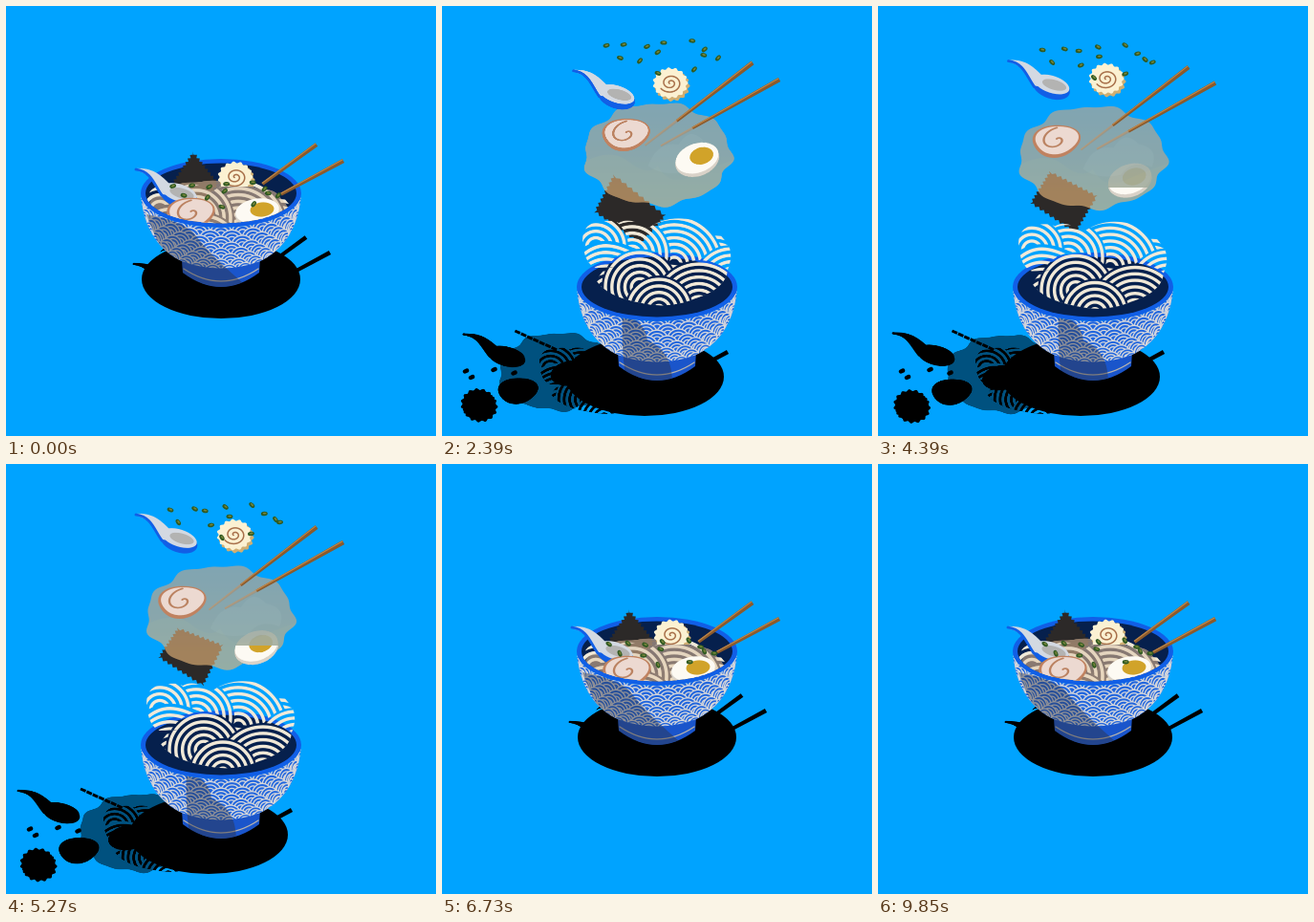
An HTML page with a canvas that plays this animation: 450 px wide and 450 px high, repeating every 9910 ms.

```html
<!DOCTYPE html>
<html lang="en">
<head>
<meta charset="utf-8">
<title>Ramen bowl</title>
<style>
html, body { margin: 0; width: 100%; height: 100%; overflow: hidden; background: #00a3ff; }
canvas { display: block; width: 450px; height: 450px; }
</style>
</head>
<body>
<canvas id="stage" width="450" height="450"></canvas>
<script>
const g = document.getElementById('stage').getContext('2d');
const LOOP = 9910, TAU = Math.PI * 2, BLUE = '#115fe6', CREAM = '#f1e9d8';
const lerp = (a, b, k) => a + (b - a) * k;
const clamp = (v, a = 0, b = 1) => Math.min(b, Math.max(a, v));
const ease = u => u < .5 ? 2 * u * u : 1 - 2 * (1 - u) * (1 - u);

function key(t, keys) {
  let i = 0;
  while (i < keys.length - 2 && t > keys[i + 1][0]) i++;
  const [a, b] = [keys[i], keys[i + 1]];
  return lerp(a[1], b[1], clamp((t - a[0]) / (b[0] - a[0])));
}

function oval(c, x, y, rx, ry, fill, rot = 0) {
  c.beginPath();
  c.ellipse(x, y, rx, ry, rot, 0, TAU);
  c.fillStyle = fill;
  c.fill();
}

function line(c, path, color, width) {
  c.strokeStyle = color;
  c.lineWidth = width;
  c.stroke(new Path2D(path));
}

function area(c, path, fill) {
  c.fillStyle = fill;
  c.fill(new Path2D(path));
}

// Closed outline from a polar radius function
function polar(c, rx, ry, radius, fill) {
  c.beginPath();
  for (let a = 0; a < TAU; a += .04) c.lineTo(rx * radius(a) * Math.cos(a), ry * radius(a) * Math.sin(a));
  c.closePath();
  c.fillStyle = fill;
  c.fill();
}

function spiral(c, size, turns, color, width) {
  c.beginPath();
  for (let a = 0; a < turns * TAU; a += .1) {
    const r = 1 + size * a / (turns * TAU);
    c.lineTo(r * Math.cos(a + 2.6), r * Math.sin(a + 2.6) * .85);
  }
  c.strokeStyle = color;
  c.lineWidth = width;
  c.stroke();
}

// A picture drawn once around its centre, with a black silhouette for the shadow
function sprite(w, h, draw) {
  const make = () => Object.assign(document.createElement('canvas'), { width: w * 2, height: h * 2 });
  const image = make(), dark = make();
  const c = image.getContext('2d'), d = dark.getContext('2d');
  c.setTransform(2, 0, 0, 2, w, h);
  c.lineCap = c.lineJoin = 'round';
  draw(c);
  d.drawImage(image, 0, 0);
  d.globalCompositeOperation = 'source-in';
  d.fillRect(0, 0, w * 2, h * 2);
  return { image, dark, w, h };
}

function put(s, [x, y], { sx = 1, sy = 1, rot = 0, alpha = 1, dark = false } = {}) {
  g.save();
  g.translate(x, y);
  g.rotate(rot);
  g.scale(sx, sy);
  g.globalAlpha = alpha;
  g.drawImage(dark ? s.dark : s.image, -s.w / 2, -s.h / 2, s.w, s.h);
  g.restore();
}

const noodles = sprite(164, 104, c => {
  c.clip(new Path2D('M-78-24Q-78-42-62-44Q-46-47-40-43Q-28-50-10-37Q10-52 38-46Q58-42 70-26Q82-14 74 6Q72 26 40 36Q12 48 -20 40Q-52 34-63 18Q-58 4-45 3L-64 4Q-76 0-78-24Z'));
  const rings = [[62, 2, 30], [18, 0, 48], [-26, -10, 36], [-64, -18, 30], [78, 22, 38], [-52, 30, 28], [-18, 24, 36], [44, 46, 46], [2, 48, 32]];
  const fan = ([x, y, r]) => {
    c.globalCompositeOperation = 'destination-out';
    oval(c, x, y, r + 4, r + 4, '#000');
    c.globalCompositeOperation = 'source-over';
    c.strokeStyle = CREAM;
    c.lineWidth = 3.4;
    for (let q = r; q > 1; q -= 6.8) {
      c.beginPath();
      c.arc(x, y, q, 0, TAU);
      c.stroke();
    }
  };
  rings.slice(0, 4).forEach(fan);
  const band = y => `M-80 ${y}C-50 ${y - 30} -22 ${y + 4} 6 ${y + 8}S52 ${y + 14} 80 ${y + 10}`;
  c.globalCompositeOperation = 'destination-out';
  line(c, band(0), '#000', 24);
  c.globalCompositeOperation = 'source-over';
  for (const y of [-7, 0, 7]) line(c, band(y), CREAM, 3.4);
  rings.slice(4).forEach(fan);
});

const broth = sprite(170, 124, c => {
  const edge = a => .97 + .03 * Math.sin(9 * a + 1) + .02 * Math.sin(14 * a);
  const tint = c.createLinearGradient(0, -50, 0, 55);
  tint.addColorStop(0, 'rgb(196,166,138)');
  tint.addColorStop(.45, 'rgb(208,168,130)');
  tint.addColorStop(1, 'rgb(226,178,118)');
  polar(c, 79, 55, edge, tint);
  c.globalCompositeOperation = 'source-atop';
  area(c, 'M-80 10Q-50-8-30 8T0 12Q12 34 34 24T80 6V70H-80Z', 'rgba(228,180,120,.35)');
  area(c, 'M-10 12Q0-14 22-10Q34-30 48-14Q70-10 62 10Q40 2 30 18Q6 24-10 12Z', 'rgba(235,195,150,.25)');
});

const naruto = sprite(46, 44, c => {
  const edge = a => 1 + .06 * Math.cos(15 * a);
  c.translate(1, 2);
  polar(c, 17.5, 15.5, edge, '#cfae72');
  c.translate(-2, -3);
  polar(c, 17.5, 15.5, edge, '#fbf1d2');
  spiral(c, 11, 2, '#a8704a', 1.5);
});

const chashu = sprite(58, 44, c => {
  c.rotate(-.1);
  const edge = a => 1 + .05 * Math.cos(3 * a + 1);
  polar(c, 25, 17, edge, '#c08260');
  c.translate(.5, -1);
  polar(c, 22.5, 14.5, edge, '#ecd9d1');
  c.scale(1.4, .95);
  c.rotate(2.2);
  spiral(c, 13, 1, '#bb8261', 1.7);
});

const egg = sprite(60, 44, c => {
  oval(c, 0, 1.5, 23.5, 14, '#d9d2c8', -.15);
  oval(c, 0, -.5, 23, 13, '#fdfaf3', -.15);
  oval(c, 5, -2, 12.5, 7.5, '#d1a329', -.1);
});

const spoon = sprite(110, 66, c => {
  oval(c, -1, 2, 20, 11.5, BLUE, .32);
  area(c, 'M-46-27C-28-28-20-20-10-10L-8 2L-18 0C-26-10-30-21-46-25Z', '#d3d9e2');
  oval(c, -.5, -1.5, 19, 9, '#d3d9e2', .32);
  oval(c, 2, -1, 13, 5.2, '#b3b3b2', .28);
  line(c, 'M-46-26C-30-24-27-10-19 1', BLUE, 2.8);
});

const BODY = 'M-84 0C-81 42-60 62-41 71Q0 86 41 71C60 62 81 42 84 0A84 36 0 0 1-84 0Z';
const FOOT = 'M-41 68L-40 83Q0 113 40 83L41 68Z';

const bowl = sprite(180, 206, c => {
  area(c, FOOT, '#1a55cb');
  line(c, 'M-39 79Q0 105 39 79', '#b7b3ae', 1.3);
  c.clip(new Path2D(BODY));
  area(c, BODY, BLUE);
  c.strokeStyle = '#d6d7db';
  c.lineWidth = 1.3;
  // Overlapping wave scales wrapped around the bowl, top row first
  for (let row = 0; row < 10; row++) {
    const depth = row * 6.8 - 2, radius = 84 - 34 * Math.pow(Math.max(0, depth) / 62, 1.8);
    for (let i = -6; i <= 6; i++) {
      const a = (i + row % 2 / 2) * .275, r = radius * .145;
      const x = radius * Math.sin(a), y = depth + radius * .4 * Math.cos(a) + 12;
      if (Math.cos(a) < 0) continue;
      for (const q of [1, .7, .4]) {
        c.beginPath();
        c.ellipse(x, y, r * q * (.25 + .75 * Math.cos(a)), r * q * .95, 0, 0, TAU);
        c.fillStyle = '#2166de';
        c.fill();
        c.stroke();
      }
    }
  }
});

const chives = [[172, 44], [193, 43], [212, 45], [231, 41], [229, 51], [260, 39], [273, 48], [277, 54], [288, 57], [184, 57], [210, 60], [226, 73], [261, 69]];
const noriClosed = [[196, 153], [174, 186], [198, 215], [222, 186]];
const noriOpen = [[180, 175], [160, 210], [207, 242], [231, 208]];
const noriLate = [[180, 172], [160, 202], [206, 232], [227, 190]];

function jagged(corners) {
  g.beginPath();
  corners.forEach(([x, y], k) => {
    const [u, v] = corners[(k + 1) % 4], len = Math.hypot(u - x, v - y);
    for (let i = 0; i < 18; i++) {
      const off = i % 2 ? 1.3 : -1.3;
      g.lineTo(lerp(x, u, i / 18) + (v - y) / len * off, lerp(y, v, i / 18) - (u - x) / len * off);
    }
  });
  g.closePath();
  g.fillStyle = '#2c2928';
  g.fill();
}

function chopstick([x, y], slope, length, color) {
  const n = Math.hypot(1, slope), dx = -1 / n, dy = slope / n;
  const taper = lerp(2.3, .9, length / 145);
  const ex = x + dx * length, ey = y + dy * length;
  g.beginPath();
  g.moveTo(x - dy * 2.3, y + dx * 2.3);
  g.lineTo(x + dy * 2.3, y - dx * 2.3);
  g.lineTo(ex + dy * taper, ey - dx * taper);
  g.lineTo(ex - dy * taper, ey + dx * taper);
  g.fillStyle = color;
  g.fill();
  if (color === '#000') return;
  g.beginPath();
  g.moveTo(x - dy * 1.4, y + dx * 1.4);
  g.lineTo(ex - dy * taper * .6, ey + dx * taper * .6);
  g.strokeStyle = '#bd8649';
  g.lineWidth = 1.2;
  g.stroke();
}

function clipped(x, y, w, h, draw) {
  g.save();
  g.beginPath();
  g.rect(x, y, w, h);
  g.clip();
  draw();
  g.restore();
}

function render(t) {
  const p = t < 4000 ? ease(clamp((t - 930) / 1250)) : 1 - ease(clamp((t - 5950) / 770));
  const drift = (clamp(t, 2100, 6200) - 3520) / 1750;
  const bob = 1.8 * Math.sin(Math.PI * clamp((t - 6720) / 3190));
  const s = (a, b) => lerp(a, b, p);
  // closed place, open place, open place after the slow drift
  const at = (x0, y0, x1, y1, x2 = x1, y2 = y1) =>
    [s(x0, lerp(x1, x2, drift)), s(y0, lerp(y1, y2, drift))];

  g.fillStyle = '#00a3ff';
  g.fillRect(0, 0, 450, 450);

  // Shadows
  const shade = (item, pos, sx = 1, sy = 1, alpha = 1) => put(item, pos, { sx, sy, alpha, dark: true });
  shade(broth, at(222, 286, 128, 384, 138, 386), .8, s(.68, .76), .5);
  shade(noodles, at(225, 286, 168, 393), .85, .78);
  shade(spoon, at(180, 292, 65, 365, 59, 364), 1, .85);
  shade(naruto, at(225, 282, 37, 418, 34, 419));
  shade(chashu, at(205, 288, 78, 403, 76, 404), .84, .8);
  shade(egg, at(235, 285, 132, 386, 128, 390), .9, .9);
  const [nx, ny] = at(185, 275, 77, 340, 78, 340);
  g.setLineDash([6, 1]);
  line(g, `M${nx} ${ny}l44 ${s(8, 20)}`, '#000', 3);
  g.setLineDash([]);
  chives.filter((_, i) => i % 3 === 0).forEach(([x, y]) => {
    const [sx, sy] = at(215 + (x - 225) * .5, 285, 25 + (x - 172) * .5, 385 + (y - 50) * .5);
    oval(g, sx, sy, 3.4, 2.3, '#000', -.4);
  });
  for (const [x, y, slope] of [[314, 242, .73], [339, 258, .54]]) {
    const [cx, cy] = at(x, y, x - 40, y + 104);
    chopstick([cx + bob * .6, cy + bob * .6], slope, 62, '#000');
  }
  const [ex, ey] = at(225, 286, 212, 388);
  oval(g, ex, ey, 83, 41, '#000');

  // Bowl
  const [bx, by] = at(225, 196, 225, 294);
  oval(g, bx, by, 84, 36, BLUE);
  put(bowl, [bx, by]);
  g.save();
  g.translate(bx, by);
  g.clip(new Path2D(BODY + FOOT));
  area(g, `M${s(-78, -36)} ${s(22, 28)}Q${s(-35, -12)} ${s(30, 36)} ${s(-25, -10)} ${s(46, 56)}Q${s(-10, 16)} 66 ${s(30, 16)} 100H-32Q${s(-64, -38)} 64 ${s(-78, -36)} ${s(22, 28)}Z`, 'rgba(48,48,58,.42)');
  g.restore();
  oval(g, bx, by, 79, 31.5, '#06204d');

  // Contents, hidden by the front of the rim
  const sticks = [[at(325, 145, 325, 62, 325, 66), s(.73, .77), s(70, 100)],
                  [at(353, 162, 353, 79, 353, 82), s(.54, .56), s(74, 104)]];
  const eggAt = at(263, 215, 265, 172, 262, 191);
  const eggPose = { rot: -.12 * p, sy: s(1, 1.18) };
  const eggCut = key(t, [[2150, -30], [3520, 18], [5270, -1], [6200, -30]]);
  const noodleAt = at(225, 232, 225, 272, 225, 275);
  g.save();
  g.beginPath();
  g.rect(0, -50, 450, by + 50);
  g.ellipse(bx, by, 79, 31.5, 0, 0, Math.PI);
  g.clip();
  jagged(noriClosed.map(([x, y], i) => at(x, y, ...noriOpen[i], ...noriLate[i])));
  put(noodles, noodleAt);
  g.globalAlpha = p * .5;
  for (const [pos, slope] of sticks) chopstick(pos, slope, 142, '#7c4f25');
  g.globalAlpha = 1;
  if (eggCut > -28) put(egg, eggAt, { ...eggPose, alpha: .3 });
  put(broth, at(222, 222, 225, 157, 224, 160), { sy: Math.min(1, .75 + p * .6), alpha: .66 });
  put(noodles, noodleAt, { alpha: .55 * clamp(1 - 2.5 * p) });
  put(spoon, at(182, 197, 183, 88, 182, 79));
  put(chashu, at(193, 217, 189, 138, 184, 144));
  clipped(0, eggAt[1] + eggCut, 450, 450, () => put(egg, eggAt, eggPose));
  g.restore();

  // Pieces standing clear of the bowl
  clipped(0, 0, 450, s(189, 520), () => put(naruto, at(241, 180, 240, 79, 240, 75)));
  for (const [pos, slope, length] of sticks) chopstick([pos[0] + bob, pos[1] + bob], slope, length, '#8c5a2b');
  chives.forEach(([x, y], i) => {
    const [cx, cy] = at(225 + (x - 225) * .95, 184 + (y - 38) * .75, x, y, x + 5 * Math.sin(i * 2), y + 4);
    const rot = Math.sin(i * 3) * .6 + drift * .4;
    oval(g, cx, cy, 3.5, 2.2, '#2f5a22', rot);
    oval(g, cx + .3, cy - .4, 1.9, .9, '#77843a', rot);
  });
}

function tick(now) {
  render(now % LOOP);
  requestAnimationFrame(tick);
}
requestAnimationFrame(tick);
</script>
</body>
</html>
```
